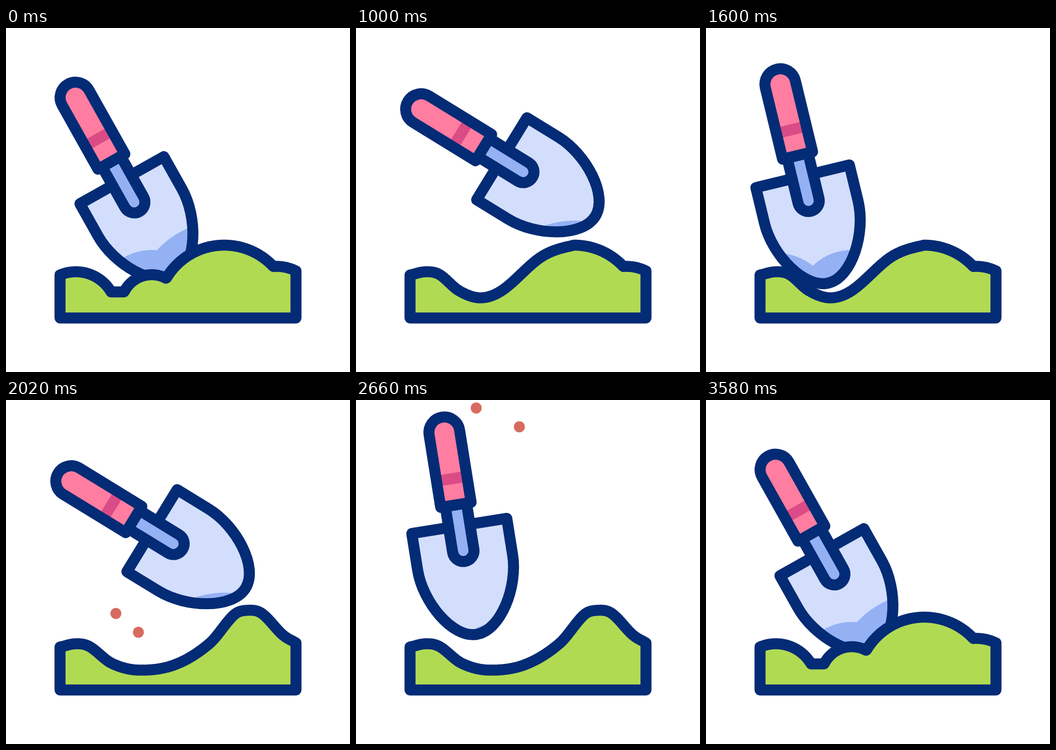
An HTML page with a canvas that plays this animation: 640x640 px, repeating every 3600 ms.

```html
<!DOCTYPE html>
<html lang="en">
<head>
<meta charset="utf-8">
<title>Trowel digging</title>
<style>
html, body { margin: 0; width: 100%; height: 100%; overflow: hidden; background: #fff; }
canvas { display: block; width: 640px; height: 640px; }
</style>
</head>
<body>
<canvas id="stage" width="640" height="640"></canvas>
<script>
const ctx = document.getElementById('stage').getContext('2d');
const LOOP = 3600;
const NAVY = '#042b75', GREEN = '#b1da53', PINK = '#ff7da0', BAND = '#db4b85';
const BLADE = '#d3defd', STEEL = '#94b1f4', DIRT = '#d86b5f';
const LEFT = 100.5, RIGHT = 539.5, BASE = 539.5, FLOOR = 491;

const mix = (a, b, u) => a + (b - a) * u;
const ease = u => (1 - Math.cos(Math.PI * u)) / 2;

// Keys are [time, value, bend]; returns the two neighbours and the eased progress.
function span(keys, t) {
  const i = Math.max(1, keys.findIndex(key => t < key[0]));
  const [from, a] = keys[i - 1], [to, b, bend] = keys[i];
  return { a, b, bend, u: ease((t - from) / (to - from)) };
}

// Heaps are circles; "shade" is how far each one's shadow reaches beyond it.
const heaps = [
  { x: 130, top: 453.5, r: 76, shade: 35 },
  { x: 271, top: 459, r: 57, shade: 46 },
  { x: 406, top: 404, r: 125, shade: 45.5 },
  { x: 503, top: 443.5, r: 83, shade: 0 }
];

function heapTop(h, x, grow) {
  const r = h.r + grow, dx = x - h.x;
  return Math.abs(dx) < r ? h.top + h.r - Math.sqrt(r * r - dx * dx) : Infinity;
}

const bumpy = x => Math.min(FLOOR, ...heaps.map(h => heapTop(h, x, 0)));
const shadow = x => Math.min(BASE, ...heaps.map(h => heapTop(h, x, h.shade)));

// Smooth curve y(x) through a few points.
function curve(points) {
  const slope = i => {
    const [x0, y0] = points[Math.max(0, i - 1)];
    const [x1, y1] = points[Math.min(points.length - 1, i + 1)];
    return (y1 - y0) / (x1 - x0);
  };
  return x => {
    const i = Math.max(1, points.findIndex(p => x <= p[0]));
    const [x0, y0] = points[i - 1], [x1, y1] = points[i];
    const w = x1 - x0, u = (x - x0) / w, v = 1 - u;
    return v * v * (1 + 2 * u) * y0 + u * u * (1 + 2 * v) * y1
      + u * v * w * (v * slope(i - 1) - u * slope(i));
  };
}

const shoulder = [[LEFT, 459.5], [130, 453.5], [155, 458.5]];
const pit = curve([...shoulder, [192, 489], [232, 502], [272, 488], [346, 425], [406, 404], [430, 406]]);
const dug = x => x < 406 ? pit(x) : bumpy(x);
const deep = curve([...shoulder, [197, 490], [247, 502.5], [314, 492.5], [378, 453.5],
  [424, 400], [446, 391.5], [475, 396.5], [515, 437], [RIGHT, 452]]);

const grounds = [
  [0, bumpy], [760, bumpy], [1000, dug], [1740, dug], [2000, deep],
  [3360, deep], [3580, bumpy], [LOOP, bumpy]
];

// Tilt in degrees and position of the shaft end.
const rest = { tilt: 29.3, x: 238.5, y: 324 };
const raised = { tilt: 13.6, x: 188.5, y: 288 };
const plunged = { tilt: 13.6, x: 192, y: 340 };
const scooped = { tilt: 58.6, x: 311.5, y: 267.5 };
const upright = { tilt: -0.65, x: 147.5, y: 282 };
const arc = { x: 321, y: 278 };

const poses = [
  [0, rest], [200, rest],
  [390, raised], [760, plunged], [1010, scooped],
  [1400, raised], [1740, plunged], [2000, scooped],
  [2900, upright, arc], [3360, upright], [3580, rest], [LOOP, rest]
];

const clods = [
  { x: 217, drift: 0.03, top: -17 },
  { x: 284, drift: 0.09, top: 18 }
];

const bladePath = new Path2D(
  'M-89.5-46.8L-89.5 22C-89.5 82-46 157.5 0 157.5S89.5 82 89.5 22L89.5-46.8Z');
const shaftPath = new Path2D('M-20-90L-20 0A20 20 0 0 0 20 0L20-90Z');
const handlePath = new Path2D('M-28.7-86.5L-28.7-223A28.7 28.7 0 0 1 28.7-223L28.7-86.5Z');

function landPath(surface) {
  const path = new Path2D();
  path.moveTo(LEFT, BASE);
  for (let x = LEFT; x <= RIGHT; x++) path.lineTo(x, surface(x));
  path.lineTo(RIGHT, BASE);
  path.closePath();
  return path;
}
const shadowPath = landPath(shadow);

function fill(path, color) {
  ctx.fillStyle = color;
  ctx.fill(path);
}

function outline(path, color) {
  fill(path, color);
  ctx.stroke(path);
}

function drawClods(t) {
  if (t < 2000) return;
  for (const c of clods) {
    const y = c.top + 0.00165 * (t - 2522) ** 2;
    if (y > 500) continue;
    const dot = new Path2D();
    dot.arc(c.x + c.drift * (t - 2440), y, 10.3, 0, Math.PI * 2);
    fill(dot, DIRT);
  }
}

function drawTrowel(t) {
  const { a, b, bend, u } = span(poses, t);
  const at = axis => bend
    ? mix(mix(a[axis], bend[axis], u), mix(bend[axis], b[axis], u), u)
    : mix(a[axis], b[axis], u);
  ctx.save();
  ctx.translate(at('x'), at('y'));
  ctx.rotate(-mix(a.tilt, b.tilt, u) * Math.PI / 180);

  fill(bladePath, BLADE);
  // The shadow stays fixed to the stage and shows only on the blade.
  ctx.save();
  ctx.clip(bladePath);
  ctx.resetTransform();
  fill(shadowPath, STEEL);
  ctx.restore();
  ctx.stroke(bladePath);

  outline(shaftPath, STEEL);
  fill(handlePath, PINK);
  ctx.fillStyle = BAND;
  ctx.fillRect(-28, -146, 56, 20.5);
  ctx.stroke(handlePath);
  ctx.restore();
}

function drawGround(t) {
  const { a, b, u } = span(grounds, t);
  outline(landPath(x => mix(a(x), b(x), u)), GREEN);
}

function draw(t) {
  ctx.fillStyle = '#fff';
  ctx.fillRect(0, 0, 640, 640);
  ctx.strokeStyle = NAVY;
  ctx.lineWidth = 20.5;
  ctx.lineJoin = 'round';
  drawClods(t);
  drawTrowel(t);
  drawGround(t);
}

const start = performance.now();
function tick() {
  draw((performance.now() - start) % LOOP);
  requestAnimationFrame(tick);
}
tick();
</script>
</body>
</html>
```
